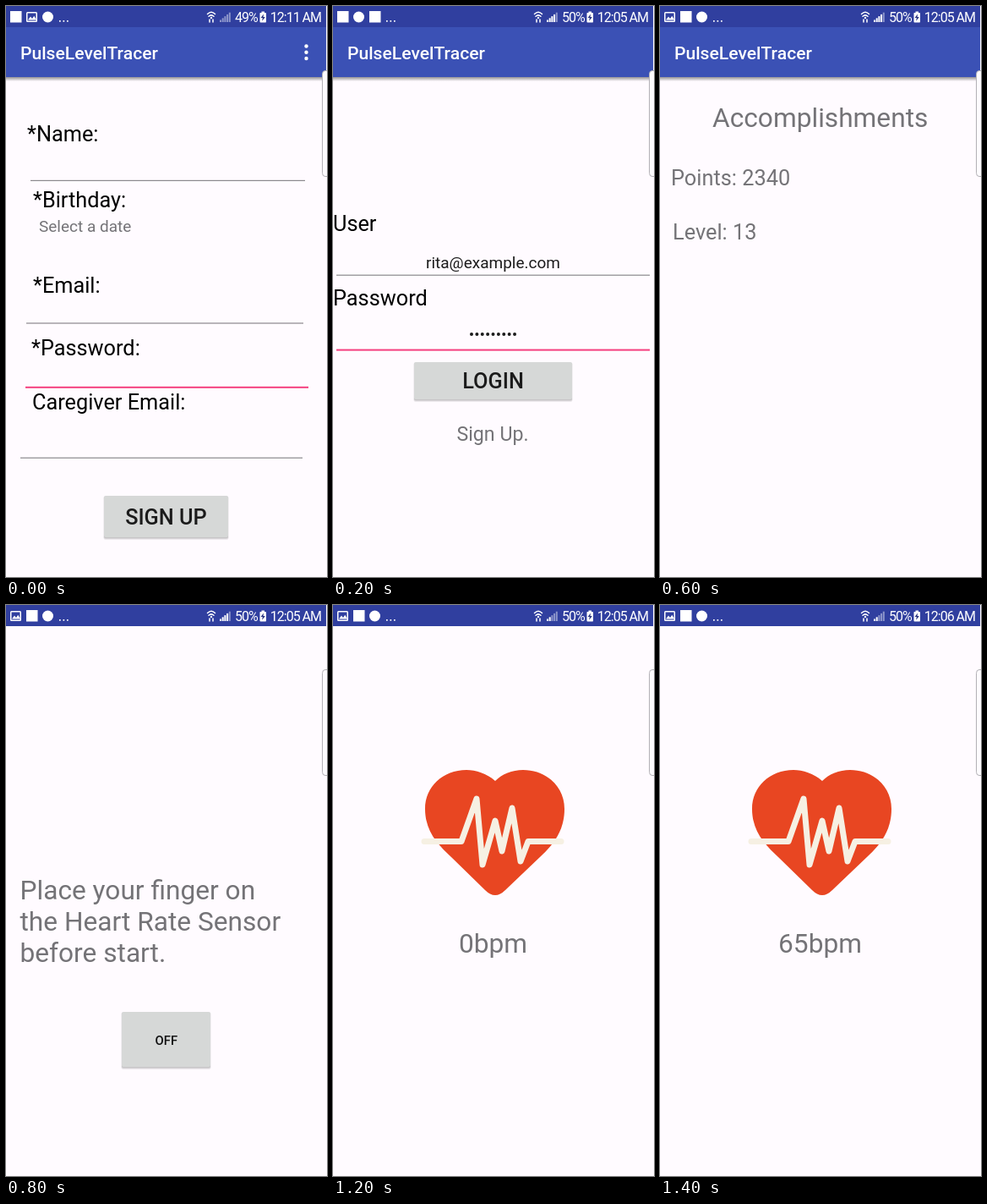
Recreate the animation shown at these times as an HTML page. Size 380 by 675 pixels, loop 1600 ms.

```html
<!DOCTYPE html>
<html lang="en">
<head>
<meta charset="utf-8">
<title>App walkthrough</title>
<style>
  html, body { margin: 0; width: 100%; height: 100%; overflow: hidden; background: #fffbff; }
  svg { display: block; width: 100%; height: 100%; }
  text { font-family: Roboto, Arial, sans-serif; white-space: pre; }
</style>
</head>
<body>
<svg id="stage" viewBox="0 0 380 675" xmlns="http://www.w3.org/2000/svg"></svg>
<script>
const STEP = 200;
const WIDTH = 379;
const GREY = '#747377', PINK = '#f5407f';
const APP = 'PulseLevelTracer';

const rect = (x, y, w, h, fill, more = '') =>
  `<rect x="${x}" y="${y}" width="${w}" height="${h}" fill="${fill}" ${more}/>`;
const circle = (x, y, r, fill, more = '') =>
  `<circle cx="${x}" cy="${y}" r="${r}" fill="${fill}" ${more}/>`;
const shape = (d, fill) => `<path d="${d}" fill="${fill}"/>`;
const stroke = (d, color, width) =>
  `<path d="${d}" fill="none" stroke="${color}" stroke-width="${width}" stroke-linecap="round" stroke-linejoin="round"/>`;
const text = (s, x, y, size, fill = '#000', more = '') =>
  `<text x="${x}" y="${y}" font-size="${size}" fill="${fill}" ${more}>${s}</text>`;
const centred = (s, x, y, size, fill, weight = 400) =>
  text(s, x, y, size, fill, `text-anchor="middle" font-weight="${weight}"`);
const field = (x1, x2, y) => rect(x1, y, x2 - x1, 1.2, '#8b898d');
const focusField = (x1, x2, y) => rect(x1, y, x2 - x1, 2, PINK);

// Status bar
const icons = {
  photo: x => rect(x, 7, 13, 12, '#fff', 'rx="1.5"') + rect(x + 1.5, 8.5, 10, 9, '#303f9f') +
    shape(`M${x + 2} 16.5l3-4 2 2.5 2.2-3.2 3 4.7z`, '#fff'),
  box: x => rect(x, 6, 13.5, 13.5, '#fff'),
  dot: x => circle(x + 6.5, 13, 6.5, '#fff')
};

function signal(level) {
  let s = '';
  for (let i = 0; i < 5; i++) {
    const h = 2.5 + i * 2.2;
    s += rect(253 + i * 2.7, 19 - h, 2, h, '#fff', `opacity="${i < level ? 1 : 0.45}"`);
  }
  return s;
}

function statusBar({ left, charge = '50%', clock = '12:05 AM', bars = 4 }) {
  const tight = 'letter-spacing="-1"';
  return rect(0, 0, WIDTH, 25, '#303f9f') +
    left.map(([name, x]) => icons[name](x)).join('') +
    [63, 67.5, 72].map(x => rect(x, 17, 1.7, 1.7, '#fff')).join('') +
    stroke('M238.5 9.5Q243 5 247.5 9.5M240 12.2Q243 9.5 246 12.2', '#fff', 1.5) +
    circle(243, 14, 1.2, '#fff') +
    stroke('M241 19v-3M245 16v3', '#fff', 1.5) +
    signal(bars) +
    text(charge, 271, 19, 16, '#fff', tight) +
    rect(302.5, 6.5, 3.5, 2, '#fff') + rect(300.5, 8, 7.5, 11.5, '#fff', 'rx="0.8"') +
    shape('M305 9.5l-3.4 4.6h2.2l-.6 3.7 3.6-4.9h-2.3z', '#26327f') +
    text(clock, 312.8, 19, 16, '#fff', tight);
}

const appBar = (x = 17) =>
  rect(0, 84, WIDTH, 5, 'url(#barShadow)') + rect(0, 25, WIDTH, 59, '#3b51b5') +
  text(APP, x, 62.6, 21.1, '#fff', 'font-weight="500"');

const edgeHandle =
  '<path d="M381 76.5h-3q-3.5 0-3.5 4v117q0 4 3.5 4h3" fill="#fdfbfe" stroke="#b2b0b5" stroke-width="1"/>';

const button = (x, y, w, h, depth = 1) =>
  rect(x - 0.5, y + 0.5, w + 1, h + 2.3, '#000', 'rx="2" opacity="0.1"') +
  rect(x, y + 1, w, h + 0.4, '#000', `rx="2" opacity="${0.13 * depth}"`) +
  rect(x, y, w, h, '#d6d8d7', 'rx="2"');

// Illustrations
function star(cx, cy, outer, inner) {
  const points = [];
  for (let i = 0; i < 10; i++) {
    const r = i % 2 ? inner : outer, a = (i * 36 - 90) * Math.PI / 180;
    points.push(`${(cx + r * Math.cos(a)).toFixed(1)},${(cy + r * Math.sin(a)).toFixed(1)}`);
  }
  return `<polygon points="${points.join(' ')}" fill="#f79a36" stroke="#f79a36" stroke-width="2.5" stroke-linejoin="round"/>`;
}

const trophy =
  stroke('M67 199C54 196 44 202 44 213C44 227 58 235 75 239', '#f9a533', 5.5) +
  stroke('M145 199C158 196 168 202 168 213C168 227 154 235 137 239', '#ee8429', 5.5) +
  shape('M65 186H148V213C148 239 133 260 106 260C80 260 65 239 65 213Z', '#fedc36') +
  shape('M119 186H148V213C148 239 133 260 106 260C116 246 119 229 119 208Z', '#fdbd32') +
  rect(57, 181, 99, 7.5, '#f8a033', 'rx="3.7"') +
  star(106.5, 218.5, 21, 11.5) +
  rect(95, 258, 23, 30, '#fedc36') + rect(106, 258, 12, 30, '#fcb030') +
  shape('M79 304L82 293Q84 287 91 287H121Q128 287 130 293L133 304Z', '#fedc36') +
  shape('M106 287H121Q128 287 130 293L133 304H106Z', '#f9a630');

const doctor =
  shape('M239 252C230 241 227 222 228 206C230 185 247 172 269 172C292 172 308 184 307 206C307 222 305 232 298 241L270 257Z', '#86352b') +
  shape('M213 303V286C213 272 223 264 238 262L259 258H282L304 262C319 265 327 273 327 286V303Z', '#9097d0') +
  shape('M256 259L270 303L289 259Z', '#c47b25') +
  shape('M259 280L271 284L283 280L279 303H264Z', '#565c77') +
  shape('M261 240H286V269Q274 283 261 269Z', '#b66f21') +
  shape('M247 217C250 203 268 199 287 190C291 199 297 205 303 206C304 232 292 250 275 250C258 250 246 234 247 217Z', '#ca8027') +
  stroke('M243 262Q246 278 239 288', '#dce0ec', 3) +
  circle(237, 293, 4.5, '#9097d0', 'stroke="#dce0ec" stroke-width="3"') +
  stroke('M303 262V271M297 298Q291 295 293 283Q295 271 303 271Q311 271 313 283Q315 295 309 298', '#dce0ec', 3);

const goldHeart =
  shape('M137 458C125 426 140 400 161 400Q178 400 188 410Q198 400 216 400C238 400 248 420 243 445H219L210 440L203 449L193 432L181 471L169 446L161 458Z', '#fee187') +
  stroke('M137 452C125 426 140 400 161 400Q178 400 188 410Q198 400 216 400C238 400 248 420 243 443', '#fdc51d', 6) +
  stroke('M140 461C150 478 168 488 188 496.5C205 488 219 479 229 466.5', '#fdc51d', 6) +
  stroke('M130 458.5H161L169 446L181 471L193 431L203 449L210 440L219 446H250', '#fdc51d', 6);

const redHeart =
  shape('M192 208C182 199 169 195 158 195C130 195 109 215 109 241C109 268 125 284 140 298L180 337Q192 349 204 337L246 297C262 282 274 266 274 241C274 214 252 195 225 195C212 195 200 200 192 208Z', '#e84622') +
  stroke('M108 279.5H152L170 229L177 307L192 255L200 291L212 240L222 303L231 279.5H270', '#f6f0e3', 7);

// Screens
const before = [['photo', 5], ['box', 24], ['dot', 43]];

const signUp =
  appBar() + [47.5, 54.8, 62].map(y => circle(355.5, y, 2.2, '#fff')).join('') +
  statusBar({ left: [['box', 5], ['photo', 24], ['dot', 43]], charge: '49%', clock: '12:11 AM', bars: 0 }) +
  text('*Name:', 25, 160, 25.3) + field(29, 354, 205.8) +
  text('*Birthday:', 32, 238.4, 25.3) + text('Select a date', 39, 267, 19, GREY) +
  text('*Email:', 32, 338.6, 25.3) + field(24, 352, 374.4) +
  text('*Password:', 30, 413, 25.3) + focusField(23, 358, 449.8) +
  text('Caregiver Email:', 31, 477, 25.3) + field(17, 351, 533.6) +
  button(116, 579, 147, 49) + centred('SIGN UP', 189.5, 613, 25.3, '#1b1b1b', 500);

const login =
  appBar() + statusBar({ left: [['box', 5], ['dot', 24], ['box', 43]] }) +
  text('User', 0, 266, 25.3) + centred('rita@example.com', 189.5, 310, 19, '#1c1c1c') + field(4, 375, 317.6) +
  text('Password', 0, 354, 25.3) +
  Array.from({ length: 9 }, (_, i) => circle(164 + i * 6.38, 388, 2, '#1c1c1c')).join('') +
  focusField(4, 375, 405.6) +
  button(96, 421, 187, 44) + centred('LOGIN', 189.5, 452.4, 25.3, '#1b1b1b', 500) +
  centred('Sign Up.', 189, 514, 23.2, GREY);

const menu =
  appBar(76) + stroke('M37.5 55H22M29.5 47.5L22 55L29.5 62.5', '#fff', 2) +
  statusBar({ left: before }) +
  trophy + doctor + goldHeart +
  centred('Accomplishments', 106.3, 338, 19, '#000') +
  centred('Health Tips', 269, 334, 19, '#000') +
  centred('Pulse Level Tracer', 189.7, 526.4, 19, '#000');

const scores =
  appBar() + statusBar({ left: before }) +
  centred('Accomplishments', 189.7, 143.4, 31.67, GREY) +
  text('Points: 2340', 13, 212.3, 25.33, GREY) +
  text('Level: 13', 15, 276.3, 25.33, GREY);

const sensor = pressed =>
  statusBar({ left: before, bars: pressed ? 2 : 4 }) +
  ['Place your finger on', 'the Heart Rate Sensor', 'before start.']
    .map((s, i) => text(s, 16.5, 347.5 + i * 37, 31.67, GREY)).join('') +
  button(137, 481, 105, 65, pressed ? 1.5 : 1) +
  (pressed ? rect(137, 545, 105, 2, '#69696b') + rect(138, 547, 103, 3, '#000', 'opacity="0.12"') : '') +
  centred('OFF', 189.8, 520.2, 14.8, '#101010', 500);

const pulse = (rate, clock) =>
  statusBar({ left: before, clock, bars: 2 }) + redHeart +
  centred(rate + 'bpm', 189.5, 411.3, 31.67, GREY);

const screens = [
  signUp, login, menu, scores,
  sensor(false), sensor(true), pulse(0, '12:05 AM'), pulse(65, '12:06 AM')
];

const stage = document.getElementById('stage');
stage.innerHTML =
  `<defs><linearGradient id="barShadow" x2="0" y2="1">
    <stop stop-color="#000" stop-opacity=".42"/><stop offset="1" stop-color="#000" stop-opacity="0"/>
  </linearGradient></defs>` +
  rect(0, 0, 380, 675, '#fffbff') +
  screens.map(s => `<g class="screen" display="none">${s}</g>`).join('') + edgeHandle;

const groups = stage.querySelectorAll('.screen');

function draw(ms) {
  const current = Math.floor(ms / STEP) % groups.length;
  groups.forEach((g, i) => g.setAttribute('display', i === current ? 'inline' : 'none'));
}

const start = performance.now();
function tick() {
  draw(performance.now() - start);
  requestAnimationFrame(tick);
}
tick();
</script>
</body>
</html>
```
